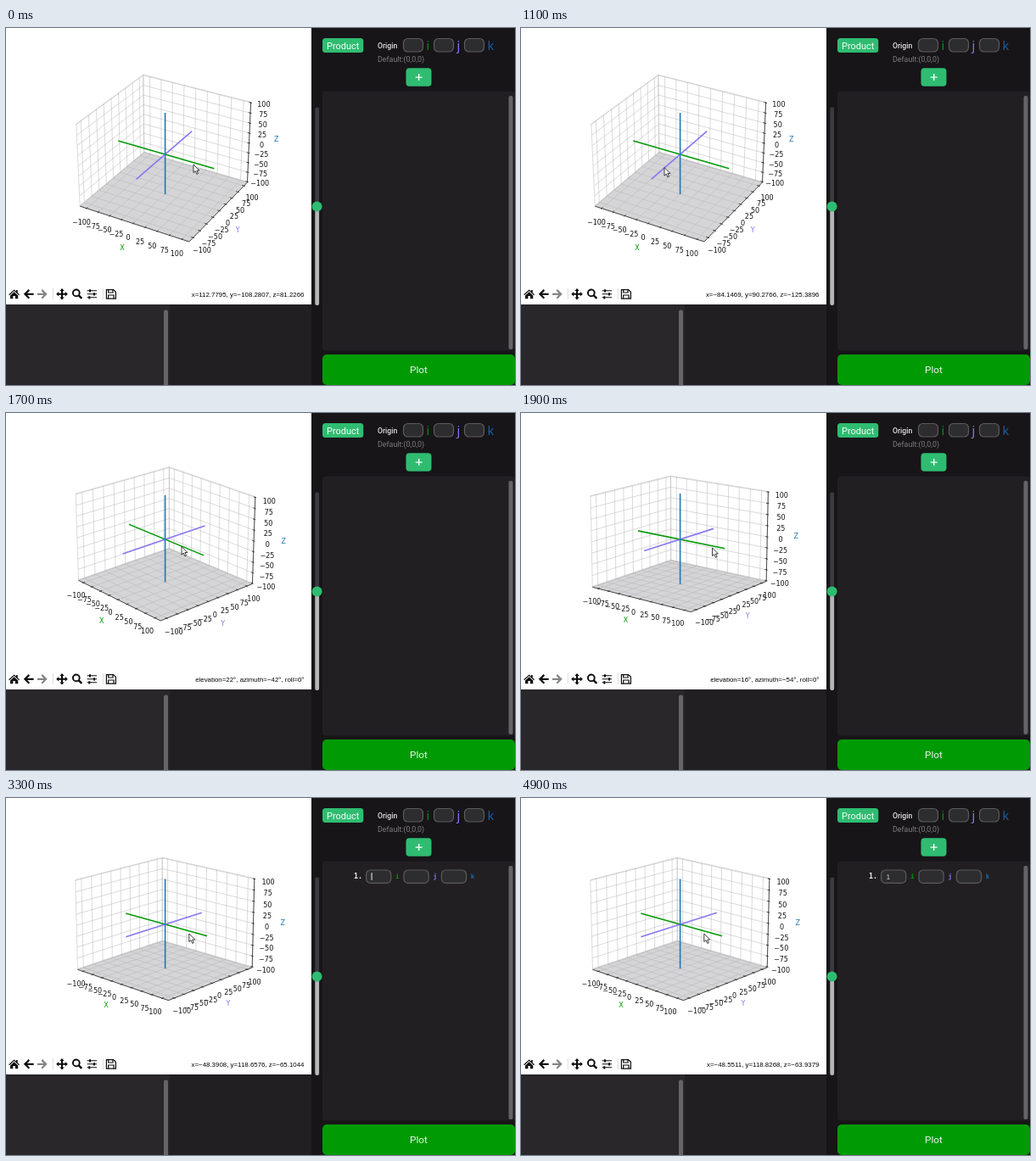
Animation, 600 px wide and 421 px high, one loop 5000 ms. Source, as an HTML page:

```html
<!DOCTYPE html>
<html lang="en">
<head>
<meta charset="utf-8">
<title>Vector plotter</title>
<style>
  html, body { margin: 0; width: 100%; height: 100%; overflow: hidden; background: #171518; }
  svg { display: block; width: 600px; height: 421px; }
  text { white-space: pre; }
  .ui { font-family: Roboto, "Open Sans", sans-serif; }
  .sans { font-family: "Noto Sans", sans-serif; }
  .mono { font-family: "DejaVu Sans Mono", monospace; font-weight: bold; }
  .plot { font: 8px "DejaVu Sans", sans-serif; text-anchor: middle; }
  .status { font: 7.9px "Liberation Sans", Arial, sans-serif; text-anchor: end; }
  .field { fill: #2d2c2f; stroke: #5b5a5d; stroke-width: 1.2; }
  .grid { fill: none; stroke: #b4b4b6; stroke-width: .5; }
  .edge { fill: none; stroke: #1a1a1a; stroke-width: .75; }
</style>
</head>
<body>
<svg viewBox="0 0 600 421">
  <rect width="600" height="421" fill="#171518"/>

  <!-- lower left panels -->
  <rect y="326" width="193" height="95" fill="#29272a"/>
  <rect x="193" y="326" width="167" height="95" fill="#211f22"/>
  <rect x="186" y="332.5" width="5" height="92" rx="2" fill="#656467"/>

  <!-- figure -->
  <rect width="360" height="326" fill="#fff"/>
  <g id="plot" class="plot"></g>

  <!-- toolbar -->
  <g fill="#0c0c0c">
    <path d="M3.2 314.3 9.6 308.4 12 310.6V309H13.7V312.2L16 314.3 15.2 315.2 9.6 310.1 4 315.2Z"/>
    <path d="M5 315.4 9.6 311.2 14.2 315.4V319.3H10.9V316H8.3V319.3H5Z"/>
    <path d="M66 307 68.7 310H67V312.8H69.8V311L72.8 313.8 69.8 316.6V314.8H67V317.6H68.7L66 320.6 63.3 317.6H65V314.8H62.2V316.6L59.2 313.8 62.2 311V312.8H65V310H63.3Z"/>
  </g>
  <g fill="none" stroke="#0c0c0c" stroke-width="2.2">
    <path d="M27.3 308.9 22.4 313.8 27.3 318.7M22.8 313.8H32.6"/>
    <path d="M42.2 308.9 47.1 313.8 42.2 318.7M46.7 313.8H37" stroke="#858585"/>
    <circle cx="82.8" cy="312.4" r="3.9" stroke-width="1.9"/>
    <path d="M85.7 315.3 89.3 318.9" stroke-width="2.4"/>
    <path d="M95.6 309.8H107M95.6 313.8H107M95.6 317.8H107" stroke-width="1.1"/>
    <path d="M99 308.2V311.4M104 312.2V315.4M98.3 316.2V319.4" stroke-width="2"/>
    <path d="M118.4 308.6H126.6L129.4 311.3V319.2H118.4Z" stroke-width="1.2"/>
    <path d="M120.7 308.8V312H126V308.8M120.7 319V315H127V319" stroke-width="1.2"/>
    <path d="M55.3 307V320M114.3 307V320" stroke="#d4d4d4" stroke-width=".8"/>
  </g>
  <text id="status" class="status" x="351.5" y="316.5" fill="#050505"></text>

  <!-- slider -->
  <rect x="364.3" y="93.5" width="4.8" height="120" rx="2" fill="#3c3a3e"/>
  <rect x="364.3" y="210" width="4.8" height="117" rx="2" fill="#b7b5b8"/>
  <circle cx="366.6" cy="210.5" r="6" fill="#2dbc71"/>

  <!-- right panel -->
  <rect x="373" y="74.5" width="227" height="306" rx="4" fill="#211f22"/>
  <rect x="592.5" y="80" width="5" height="299" rx="2" fill="#656366"/>
  <g class="ui">
    <rect x="373" y="12" width="48.3" height="17" rx="3.5" fill="#2fbc71"/>
    <text x="397.2" y="24.5" font-size="11" text-anchor="middle" fill="#f0fff6">Product</text>
    <text x="438" y="23.6" font-size="8.7" font-weight="500" fill="#e2e2e2">Origin</text>
    <text x="438" y="40.4" font-size="8.9" fill="#7d7c7f">Default:(0,0,0)</text>
    <rect x="471.5" y="47.3" width="30" height="21.5" rx="4" fill="#2fbc71"/>
    <path d="M482.7 58.1H490.7M486.7 54.1V62.1" stroke="#f4fff9" stroke-width="1.4"/>
    <rect x="373" y="385" width="227" height="36" rx="5" fill="#009a04"/>
    <text x="486.5" y="406.6" font-size="11.8" text-anchor="middle" fill="#e8f5e8">Plot</text>
  </g>
  <g id="origin" class="sans" font-size="14.5"></g>
  <g id="row" class="mono" font-size="7.6">
    <text x="410" y="95.4" font-size="8.4" fill="#f0f0f0">1.</text>
  </g>
  <text id="digit" class="mono" x="430.6" y="95.6" font-size="7.6" style="font-weight:400" fill="#d8d8d8">1</text>
  <rect id="caret" y="88.2" width="1" height="8.6" fill="#f4f4f4"/>

  <path id="cursor" d="M0 0V9.6L2.2 7.6 3.9 11.4 5.5 10.7 3.9 7H6.9Z" fill="#fff" stroke="#111" stroke-width=".8" stroke-linejoin="round"/>
</svg>
<script>
const LOOP = 5000, STEP = 100;
const GREEN = '#009a04', PURPLE = '#8877f2', BLUE = '#1f77b4';
const $ = id => document.getElementById(id);

// Moves: start, end, values reached. Values hold between moves.
const POSE = [[0, 0, 30, -60], [1400, 1700, 22, -42], [1700, 1800, 12, -46],
  [1800, 2000, 20, -62], [2000, 2200, 17.4, -47]];
const POINTER = [[0, 0, 221, 161], [0, 1100, 169, 164.5], [1100, 1400, 235, 168],
  [1400, 1700, 207, 157.5], [1700, 1900, 225.5, 159], [1900, 2200, 215.8, 160]];
const COORDS = [[0, 0, 112.7795, -108.2807, 81.2266], [0, 1100, -84.1469, 90.2766, -125.3896],
  [2200, 2300, -47.8804, 118.1168, -68.5871], [2600, 2900, -48.3908, 118.6576, -65.1044],
  [3600, 4200, -48.5511, 118.8268, -63.9379]];
const DRAG = [1500, 2300];
const LAG = 20;                      // the drawing trails the readout

const ease = f => (1 - Math.cos(Math.PI * f)) / 2;

function at(moves, t) {
  let now = moves[0].slice(2);
  for (const [start, end, ...goal] of moves.slice(1)) {
    if (t <= start) break;
    const f = ease(Math.min(1, (t - start) / (end - start)));
    now = now.map((v, i) => v + (goal[i] - v) * f);
  }
  return now;
}

// Box half sizes; a coordinate of 1 or -1 lies on a face.
const HALF = [4, 4, 3].map(v => v / 7);
const REACH = [.873, .873, .985];    // where the value 100 lies
const SCALE = 1290, CX = 187.6, CY = 149;

function camera(elev, azim) {
  const r = Math.PI / 180, ce = Math.cos(elev * r), se = Math.sin(elev * r);
  const ca = Math.cos(azim * r), sa = Math.sin(azim * r);
  return p => {
    const [x, y, z] = p.map((v, i) => v * HALF[i]);
    const near = x * ca + y * sa;
    const k = SCALE / (10 - near * ce - z * se);
    return [CX + k * (y * ca - x * sa), CY - k * (z * ce - near * se)];
  };
}

const minus = s => String(s).replace('-', '\u2212');
const TICKS = Array.from({ length: 9 }, (_, i) => i * 25 - 100);
// running axis, edge it follows, axis its tick marks point along
const AXES = [
  { name: 'X', color: GREEN, edge: [0, -1, -1], mark: 1 },
  { name: 'Y', color: PURPLE, edge: [1, 0, -1], mark: 0 },
  { name: 'Z', color: BLUE, edge: [1, 1, 0], mark: 0 }
];
const BACK = [-1, 1, -1];            // visible inner faces

function drawPlot(elev, azim) {
  const project = camera(elev, azim);
  const path = pts => 'M' + pts.map(p => project(p).map(v => v.toFixed(2)).join(' ')).join('L');
  const set = (p, i, v) => { const q = p.slice(); q[i] = v; return q; };
  const text = (p, s, color, dy) => {
    const [x, y] = project(p);
    return `<text x="${x.toFixed(2)}" y="${(y + dy).toFixed(2)}" fill="${color}">${s}</text>`;
  };
  let grid = '', edges = '', labels = '', lines = '', floor = '';

  AXES.forEach(({ name, color, edge, mark }, i) => {
    const [j, k] = [0, 1, 2].filter(n => n !== i);
    const corner = (a, b) => set(set(BACK, j, a), k, b);
    const face = path([corner(-1, -1), corner(1, -1), corner(1, 1), corner(-1, 1)]) + 'Z';
    if (name === 'Z') floor = face;
    grid += face;
    edges += path([set(edge, i, -1), set(edge, i, 1)]);
    const outward = f => edge.map(v => v * f);
    for (const n of TICKS) {
      const v = n / 100 * REACH[i], b = set(BACK, i, v), e = set(edge, i, v);
      grid += path([set(b, j, -BACK[j]), b, set(b, k, -BACK[k])]);
      edges += path([set(e, mark, edge[mark] * .966), set(e, mark, edge[mark] * 1.022)]);
      labels += text(set(outward(1.155), i, v), minus(n), '#111', 6.9);
    }
    labels += text(outward(1.335), name, color, 2.9);
    const tip = set([0, 0, 0], i, REACH[i]);
    lines += `<path d="${path([tip.map(v => -v), tip])}" stroke="${color}" stroke-width="1.6" stroke-linecap="square"/>`;
  });

  $('plot').innerHTML = `<path d="${floor}" fill="#d5d4d6"/><path class="grid" d="${grid}"/>` +
    `<path class="edge" d="${edges}"/>${lines}${labels}`;
}

function fields(id, x, y, w, h, gap, dx, base, colors) {
  $(id).innerHTML += [...'ijk'].map((c, n) =>
    `<rect class="field" x="${x + n * gap}" y="${y}" width="${w}" height="${h}" rx="5"/>` +
    `<text x="${x + n * gap + dx}" y="${base}" fill="${colors[n]}">${c}</text>`).join('');
}
fields('origin', 468.5, 12.5, 23, 15.5, 36, 27, 26, ['#0b8a18', PURPLE, '#1d5c9c']);
fields('row', 424.6, 85, 29.2, 15.4, 44.4, 34.4, 95, [GREEN, PURPLE, '#1d6aa8']);

const show = (id, on) => { $(id).style.display = on ? '' : 'none'; };

function readout(t) {
  if (t < DRAG[0] || t >= DRAG[1])
    return at(COORDS, t).map((v, i) => 'xyz'[i] + '=' + minus(v.toFixed(4))).join(', ');
  const [elev, azim] = at(POSE, t).map(v => minus(Math.round(v)));
  return `elevation=${elev}°, azimuth=${azim}°, roll=0°`;
}

let last = -1;
function frame(now) {
  const t = Math.floor(now % LOOP / STEP) * STEP;
  if (t !== last) {
    last = t;
    drawPlot(...at(POSE, t - LAG));
    $('status').textContent = readout(t);
    $('cursor').setAttribute('transform', `translate(${at(POINTER, t)})`);
    const added = t >= 3300, typed = t >= 4300;
    show('row', added);
    show('digit', typed);
    show('caret', added && t < 4500);
    $('caret').setAttribute('x', typed ? 435.4 : 430.6);
  }
  requestAnimationFrame(frame);
}
frame(0);
</script>
</body>
</html>
```
